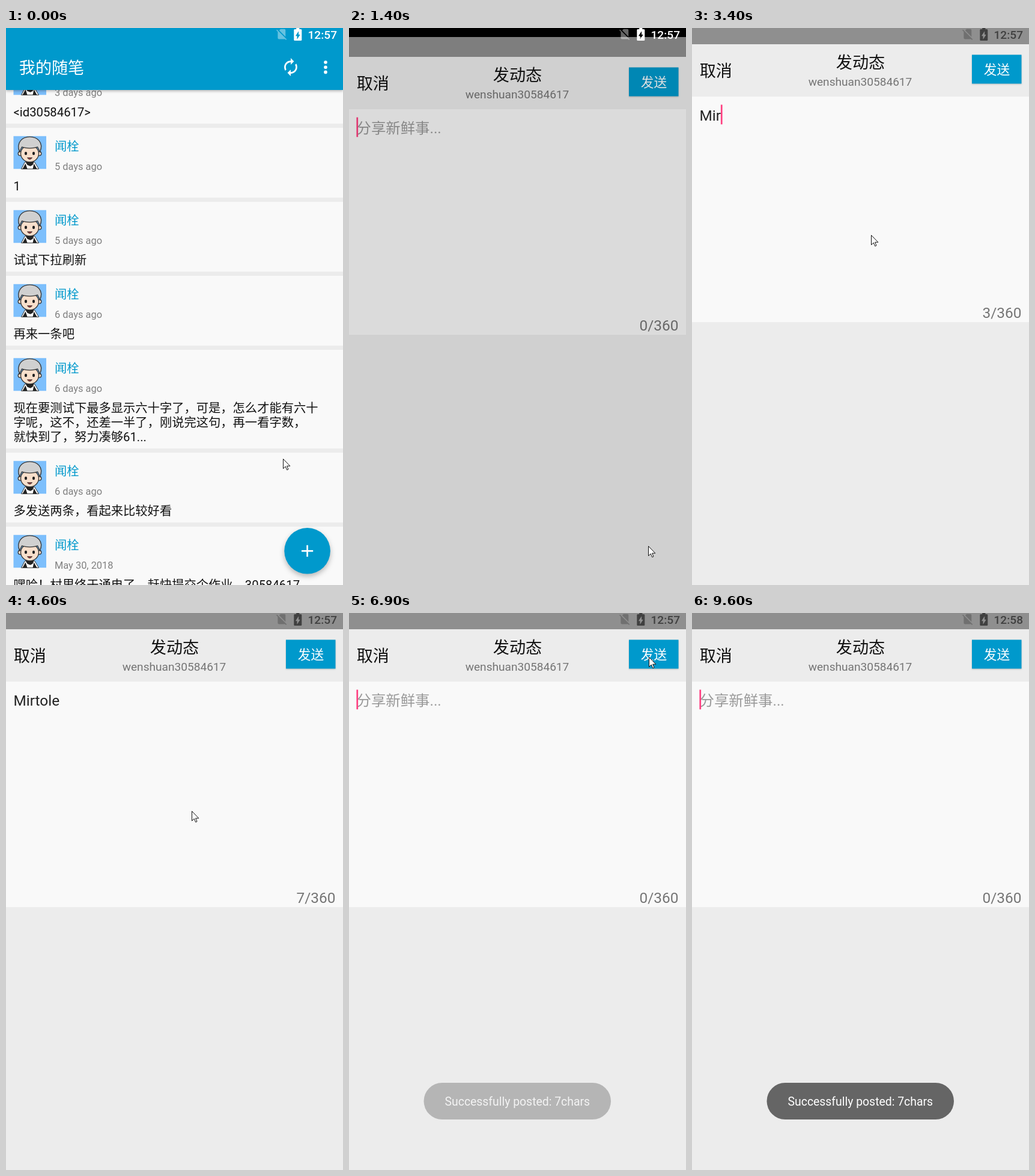
These frames come from a looping animation (561x926 px, 9.7 s). An HTML page:

```html
<!DOCTYPE html>
<html lang="zh-CN">
<head>
<meta charset="utf-8">
<style>
  html, body { margin: 0; width: 561px; height: 926px; overflow: hidden; background: #000; }
  svg { display: block; font-family: Roboto, "Noto Sans CJK SC", "Noto Sans CJK", sans-serif; }
  text { white-space: pre; }
  .mid { text-anchor: middle; }
  .end { text-anchor: end; }
  .s12 { font-size: 16.4px; }
  .s14 { font-size: 19.1px; }
  .s15 { font-size: 20.3px; }
  .s16 { font-size: 21.7px; }
  .s18 { font-size: 24.4px; }
  .s20 { font-size: 27.1px; }
  .low { filter: drop-shadow(0 1px 1px #0003); }
  .high { filter: drop-shadow(0 2px 3px #0004); }
</style>
</head>
<body>
<svg width="561" height="926" viewBox="0 0 561 926">
  <defs>
    <g id="avatar">
      <path fill="#7dbffc" d="M0 0h54.5v54.5H0z"/>
      <path fill="#fff" stroke="#333" d="M13 54.500 19 43h16l7 11.500z"/>
      <path fill="#222" d="M20 43h14l-2 5-4 2-5-2zM15 54.500l5-9 3 9zM39 54.500l-5-9-2 9z"/>
      <g fill="#f8dfcb" stroke="#333" stroke-width="1.300">
        <circle cx="11" cy="29" r="3.300"/>
        <circle cx="43" cy="29" r="3.300"/>
        <ellipse cx="27" cy="29" rx="15" ry="14"/>
      </g>
      <path fill="#d0d0d0" stroke="#333" stroke-width="1.300" d="M10 26C4 10 15 1 27 1s24 9 17 25l-4-8q-13 4-26 0z"/>
      <path stroke="#222" stroke-width="4" stroke-linecap="round" d="M20.500 28v1.500M33.500 28v1.500"/>
      <path fill="#a33" stroke="#333" d="M23 36h8q-4 5-8 0z"/>
    </g>
  </defs>

  <g id="list">
    <path fill="#ececec" d="M0 0h561v926H0z"/>
    <g id="posts"></g>
    <path fill="#09c" d="M0-6h561v109H0z" style="filter:drop-shadow(0 2px 2px #0004)"/>
    <text x="21.800" y="76" class="s20" fill="#fff">我的随笔</text>
    <path fill="#fff" transform="translate(457.600 48.700) scale(1.364)" d="M12 6v3l4-4-4-4v3c-4.420 0-8 3.580-8 8 0 1.570.46 3.030 1.240 4.260L6.700 14.800A5.870 5.870 0 0 1 6 12c0-3.310 2.690-6 6-6zm6.760 1.740L17.300 9.200c.44.84.7 1.790.7 2.800 0 3.310-2.690 6-6 6v-3l-4 4 4 4v-3c4.420 0 8-3.580 8-8 0-1.570-.46-3.030-1.240-4.260z"/>
    <path stroke="#fff" stroke-width="5.600" stroke-linecap="round" d="M532 57h.01M532 65.200h.01M532 73.400h.01"/>
    <circle cx="501.600" cy="869.300" r="38.300" fill="#09c" style="filter:drop-shadow(0 4px 4px #0004)"/>
    <circle id="ripple" cx="501.600" cy="869.300" r="38.300" fill="#fff" opacity=".12"/>
    <path stroke="#fff" stroke-width="2.700" d="M492 869.300h19.200M501.600 859.700v19.200"/>
  </g>

  <g id="compose">
    <path fill="#ececec" d="M0-6h561v940H0z"/>
    <path fill="#8f8f8f" d="M0-6h561v33H0z"/>
    <path fill="#f9f9f9" d="M0 114h561v375H0z"/>
    <text x="12.700" y="81" class="s20" fill="#111">取消</text>
    <text x="280.500" y="67" class="s20 mid" fill="#111">发动态</text>
    <text x="280" y="96" class="s14 mid" fill="#757575">wenshuan30584617</text>
    <path id="send" fill="#09c" d="M466 44.500h82.500v48H466z"/>
    <text x="507.500" y="77" class="s16 mid" fill="#fff">发送</text>
    <text id="hint" x="12.500" y="154" class="s18" fill="#9a9a9a">分享新鲜事...</text>
    <text id="typed" x="12.500" y="154" class="s18" fill="#212121"></text>
    <path id="caret" fill="#ff4081" d="M0 127.500h2.700v32.700H0z"/>
    <text id="count" x="548.500" y="482" class="s18 end" fill="#757575"></text>
  </g>

  <g id="status">
    <path opacity=".4" transform="translate(447.800 -.9) scale(.92)" d="M18.990 5c0-1.100-.89-2-1.990-2h-7L7.660 5.340 19 16.680zM3.650 3.880 2.380 5.150 5 7.770V19c0 1.100.9 2 2 2h10.010c.35 0 .67-.1.96-.26l1.880 1.880 1.270-1.270z"/>
    <path transform="translate(470.200 -2.200) scale(1.300 1.060)" d="M15.670 4H14V2h-4v2H8.330C7.600 4 7 4.600 7 5.330v15.330C7 21.400 7.600 22 8.330 22h7.330c.74 0 1.340-.6 1.340-1.330V5.330C17 4.600 16.400 4 15.670 4zM11 20v-5.500H9L13 7v5.500h2z"/>
    <text id="clock" x="551" y="18.300" class="s14 end" font-weight="500"></text>
  </g>

  <g id="toast">
    <rect x="124.500" y="781" width="311.500" height="61" rx="30.500" fill="#656565"/>
    <text x="280.300" y="819" class="mid" font-size="19.400" fill="#fff">Successfully posted: 7chars</text>
  </g>
  <path id="mouse" fill="#fff" stroke="#111" d="M.5.5v16l3.700-3.500 2.500 5.700 2.300-1-2.400-5.500h5.200z"/>
</svg>

<script>
const LOOP = 9700, STEP = 100, BLINK = 460;
const WORD = "Mirtole";
const KEYS = [2500, 3200, 3400, 3600, 3800, 3900, 4050];
const SENT = 6800;
const CARET_RESETS = [1250, ...KEYS, SENT];
const MOUSE = [
  [100, 461, 716], [800, 498, 861], [1400, 498, 861], [1900, 298, 344],
  [4500, 298, 344], [5200, 499, 73], [6900, 499, 73], [7200, 503, 73],
  [7700, 503, 73], [8200, 566, 56]
];
const POSTS = [
  ["3 days ago", "<id30584617>"],
  ["5 days ago", "1"],
  ["5 days ago", "试试下拉刷新"],
  ["6 days ago", "再来一条吧"],
  ["6 days ago", "现在要测试下最多显示六十字了，可是，怎么才能有六十",
    "字呢，这不，还差一半了，刚说完这句，再一看字数，", "就快到了，努力凑够61..."],
  ["6 days ago", "多发送两条，看起来比较好看"],
  ["May 30, 2018", "嘿哈！村里终于通电了，赶快提交个作业，30584617"]
];

const $ = id => document.getElementById(id);
const show = (id, on) => $(id).style.display = on ? "" : "none";
const clamp = p => Math.max(0, Math.min(1, p));
const smooth = p => (p = clamp(p), p * p * (3 - 2 * p));

function buildPosts() {
  let top = 43;
  $("posts").innerHTML = POSTS.map(([age, ...lines]) => {
    const height = 92 + 24 * lines.length;
    const body = lines.map((line, i) =>
      `<text x="12.500" y="${104 + 24 * i}" class="s15" fill="#111">${line.replace("<", "&lt;")}</text>`).join("");
    const post = `<g transform="translate(0 ${top})">
      <path fill="#f9f9f9" d="M0 0h561v${height}H0z"/>
      <use href="#avatar" x="12.500" y="13.800"/>
      <text x="81" y="38.300" class="s15" fill="#09c">闻栓</text>
      <text x="81" y="70" class="s12" fill="#808080">${age}</text>${body}</g>`;
    top += height + 7;
    return post;
  }).join("");
}

function mouseAt(t) {
  const next = MOUSE.findIndex(key => key[0] > t);
  if (next === 0) return MOUSE[0].slice(1);
  if (next < 0) return MOUSE.at(-1).slice(1);
  const [t0, x0, y0] = MOUSE[next - 1], [t1, x1, y1] = MOUSE[next];
  const p = smooth((t - t0) / (t1 - t0));
  return [x0 + (x1 - x0) * p, y0 + (y1 - y0) * p];
}

function draw(t) {
  show("list", t < 1400);
  show("ripple", t >= 1100 && t < 1300);

  const opened = t >= 1200;
  show("compose", opened);
  if (opened) {
    const slide = 75 * Math.exp(-0.16 * ((t - 1200) / 100) ** 3);
    $("compose").setAttribute("transform", `translate(0 ${Math.round(slide)})`);
    $("compose").setAttribute("opacity", smooth((t - 1200) / 250) ** 1.15);
  }

  const length = t < SENT ? KEYS.filter(key => key <= t).length : 0;
  $("typed").textContent = WORD.slice(0, length);
  $("count").textContent = length + "/360";
  show("hint", !length);
  $("send").setAttribute("class", t >= 5500 && t < 5700 ? "high" : "low");

  const reset = CARET_RESETS.findLast(time => time <= t) ?? 0;
  show("caret", Math.floor((t - reset) / BLINK) % 2 === 0);
  const caretX = 12.4 + (length && opened ? $("typed").getComputedTextLength() : 0);
  $("caret").setAttribute("transform", `translate(${caretX} 0)`);

  $("status").setAttribute("fill", t < 1500 ? "#fff" : "#404040");
  $("clock").textContent = t < 7500 ? "12:57" : "12:58";
  $("toast").setAttribute("opacity", clamp((t - SENT + STEP) / 500));
  $("mouse").setAttribute("transform", `translate(${mouseAt(t).map(Math.round)})`);
}

function tick() {
  draw(Math.floor(performance.now() % LOOP / STEP) * STEP);
  requestAnimationFrame(tick);
}

buildPosts();
tick();
</script>
</body>
</html>
```
